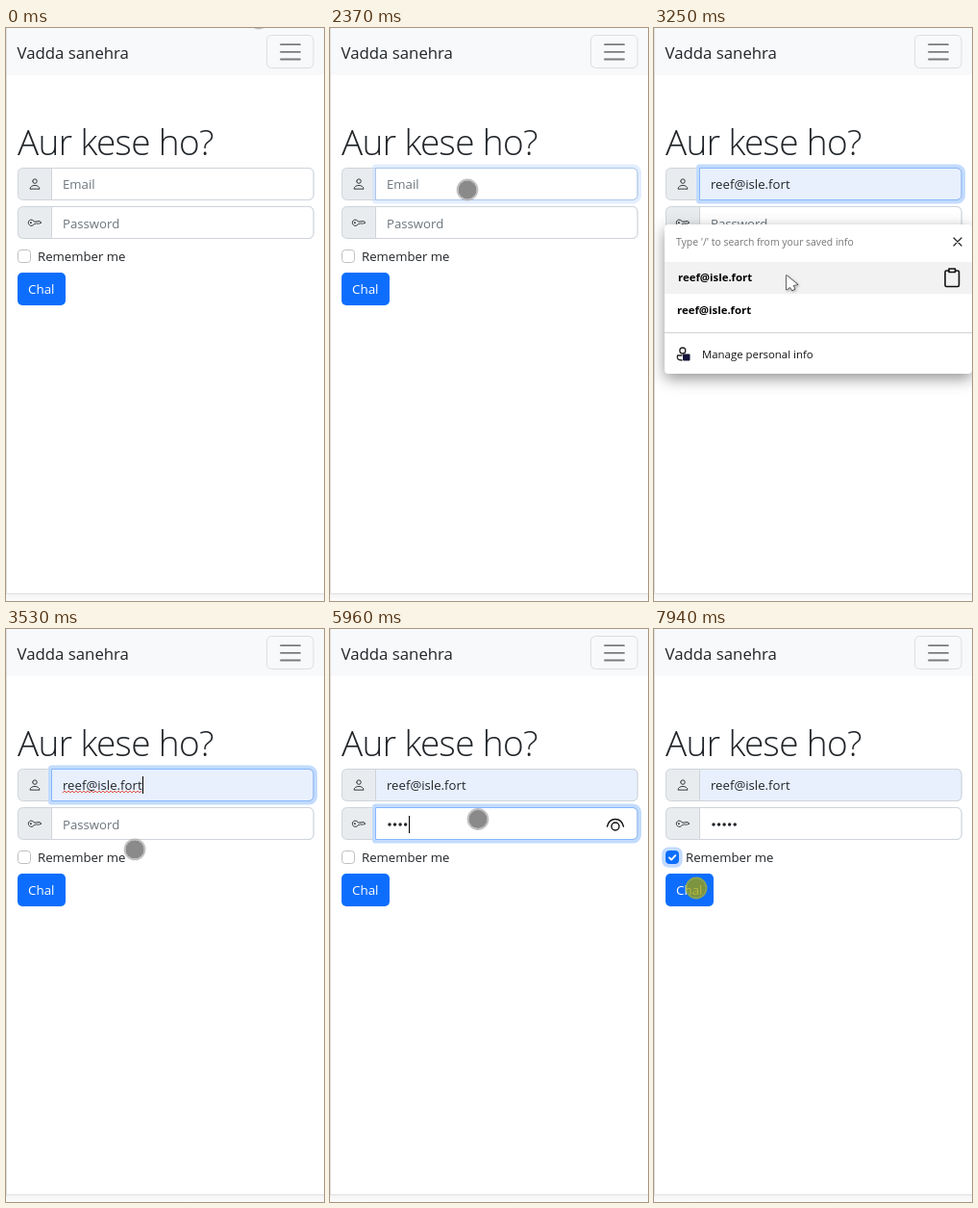
Write an HTML page with a canvas that moves like this. It is 331 px wide and 595 px high and loops after 8 s.

```html
<!DOCTYPE html>
<html lang="en">
<head>
<meta charset="utf-8">
<title>Sign in</title>
<style>
  html, body { margin: 0; width: 100%; height: 100%; overflow: hidden; background: #fff; }
  canvas { display: block; width: 100vw; height: 100vh; }
</style>
</head>
<body>
<canvas id="stage" width="331" height="595"></canvas>
<script>
const ctx = document.getElementById('stage').getContext('2d');
const LOOP = 8000;
const FONT = '"Open Sans", "Noto Sans", sans-serif';
const BRAND = 'Vadda sanehra';
const EMAIL = 'reef@isle.fort';
const BODY = 13.2;
const INK = '#212529', MUTED = '#6c757d', BLUE = '#0d6efd';
const BORDER = '#ced4da', FOCUS = '#86b7fe', AUTOFILL = '#e8f0fe';

// Moments at which the page reacts
const EMAIL_FOCUS = 2300, POPUP_OPEN = 2500, POPUP_CLOSE = 3300;
const PASS_FOCUS = 3930, CARET_OFF = 4490, CHECKED = 7440;
const KEYS = [4950, 5280, 5550, 5960, 6310];

// Pointer path: start, end, target x, target y
const MOVES = [
  [370, 1090, 297, 34.5],
  [1240, 1430, 296, 16.5],
  [1770, 2230, 143, 168],
  [2600, 2910, 138, 237],
  [2910, 3120, 138, 256.5],
  [3410, 3540, 134, 228.5],
  [3540, 3860, 152, 197.5],
  [4440, 4490, 154, 197.5],
  [6530, 6930, 61, 252],
  [7140, 7380, 20.5, 238],
  [7570, 7940, 44, 269]
];

const clamp = v => Math.max(0, Math.min(1, v));
const ease = v => v * v * (3 - 2 * v);
const fade = (t, start) => ease(clamp((t - start) / 150));

function pointerAt(t) {
  let x = 263, y = -10;
  for (const [start, end, tx, ty] of MOVES) {
    const k = ease(clamp((t - start) / (end - start)));
    x += (tx - x) * k;
    y += (ty - y) * k;
  }
  return { x, y };
}

function text(str, x, y, size, color = INK, weight = 400, spacing = 0) {
  ctx.font = `${weight} ${size}px ${FONT}`;
  ctx.letterSpacing = spacing + 'px';
  ctx.fillStyle = color;
  ctx.fillText(str, x, y);
  return ctx.measureText(str).width;
}

function box(x, y, w, h, r, fill, stroke) {
  ctx.beginPath();
  ctx.roundRect(x, y, w, h, r);
  if (fill) { ctx.fillStyle = fill; ctx.fill(); }
  if (stroke) { ctx.strokeStyle = stroke; ctx.lineWidth = 1; ctx.stroke(); }
}

function disc(x, y, r, fill) {
  ctx.beginPath();
  ctx.arc(x, y, r, 0, Math.PI * 2);
  ctx.fillStyle = fill;
  ctx.fill();
}

function line(d, x, y, scale, color, width) {
  ctx.save();
  ctx.translate(x, y);
  ctx.scale(scale, scale);
  ctx.strokeStyle = color;
  ctx.lineWidth = width;
  ctx.lineCap = ctx.lineJoin = 'round';
  ctx.stroke(new Path2D(d));
  ctx.restore();
}

function caret(x, y) {
  ctx.fillStyle = '#000';
  ctx.fillRect(Math.round(x), y, 1, 18);
}

function page() {
  ctx.fillStyle = '#fff';
  ctx.fillRect(0, 0, 331, 595);
  const shade = ctx.createLinearGradient(0, 588, 0, 595);
  shade.addColorStop(0, '#f4f4f4');
  shade.addColorStop(1, '#fcfcfc');
  ctx.fillStyle = shade;
  ctx.fillRect(0, 588, 331, 7);
  ctx.fillStyle = '#f8f9fa';
  ctx.fillRect(0, 0, 331, 49);
  ctx.fillStyle = '#dfe1e3';
  ctx.fillRect(0, 0, 1, 588);
  ctx.fillRect(0, 587, 331, 1);

  text(BRAND, 11.5, 32, 16.8);
  box(271.5, 7.5, 48.5, 34, 5, null, '#dcdee0');
  line('M286 17.2h20M286 24.9h20M286 32.5h20', 0, 0, 1, '#797c7e', 1.8);
  text('Aur kese ho?', 12, 131.5, 37, INK, 300, -0.65);
}

function field(y, fill, focus) {
  box(12.5, y, 307.5, 33, 5, '#e9ecef', BORDER);
  if (focus) {
    ctx.globalAlpha = focus;
    box(44, y - 4, 280, 41, [3.6, 8.6, 8.6, 3.6], '#c2dbfe');
    ctx.globalAlpha = 1;
  }
  const corners = [0, 5, 5, 0];
  box(47.5, y, 272.5, 33, corners, fill, BORDER);
  if (focus) {
    ctx.globalAlpha = focus;
    box(47.5, y, 272.5, 33, corners, null, FOCUS);
    ctx.globalAlpha = 1;
  }
}

function personIcon(x, y, scale) {
  line('M5.5 5a2.5 2.5 0 1 0 5 0a2.5 2.5 0 1 0-5 0M2.5 13.5c0-5 11-5 11 0z',
    x, y, scale, INK, 1);
}

function emailField(t, hovering) {
  const focus = fade(t, EMAIL_FOCUS) * (1 - fade(t, PASS_FOCUS));
  const filled = t >= POPUP_CLOSE;
  const shown = filled || hovering;
  field(145.5, shown ? AUTOFILL : '#fff', focus);
  personIcon(22.8, 154.6, 0.9);
  if (!shown) {
    text('Email', 59, 167, BODY, MUTED);
    return;
  }
  const end = 59 + text(EMAIL, 59, 167, BODY);
  if (filled && t < PASS_FOCUS) {
    let wave = 'M59 170';
    for (let x = 59, up = true; x < end - 2; x += 2, up = !up) wave += up ? 'l2-2' : 'l2 2';
    line(wave, 0, 0, 1, '#e0483e', 0.9);
    caret(end, 153);
  }
}

function passwordField(t) {
  const focus = fade(t, PASS_FOCUS) * (1 - fade(t, CHECKED));
  field(185.5, '#fff', focus);
  line('M7.2 6.5a3.5 3.5 0 1 0 0 3H8.5l1-1 1 1 1-1 1 1 1-1h1.2l.9-.6L14 6.5z',
    22.8, 195, 0.9, INK, 1);
  disc(25.9, 202.2, 0.9, INK);

  const count = KEYS.filter(k => t >= k).length;
  if (!count) text('Password', 59, 208, BODY, MUTED);
  for (let i = 0; i < count; i++) disc(62 + i * 5.55, 203, 1.75, INK);

  const active = t >= PASS_FOCUS && t < CHECKED;
  if (active && (t < CARET_OFF || count)) caret(59 + count * 5.75, 194);
  if (active && count) {
    line('M-8.5 3C-6-7 6-7 8.5 3M-4 3a4 4 0 1 0 8 0a4 4 0 1 0-8 0', 297, 202, 1, '#111', 1.4);
  }
}

function checkbox(t) {
  const on = t >= CHECKED;
  if (on) {
    ctx.globalAlpha = fade(t, CHECKED);
    box(8.2, 226.4, 21.4, 21.4, 7, '#c2dbfe');
    ctx.globalAlpha = 1;
  }
  box(12.5, 230.5, 13, 13, 3.2, on ? BLUE : '#fff', on ? BLUE : '#bfbfbf');
  if (on) line('M15.9 237.4l2.2 2.2 4.2-4.4', 0, 0, 1, '#fff', 1.9);
  text('Remember me', 33, 242, BODY);
}

function buttonPath() {
  ctx.beginPath();
  ctx.roundRect(12, 254, 50, 34, 5);
}

function button() {
  buttonPath();
  ctx.fillStyle = BLUE;
  ctx.fill();
  text('Chal', 23, 276, 13.4, '#fff', 500);
}

function popup(hovering) {
  ctx.save();
  ctx.shadowColor = 'rgba(0,0,0,.42)';
  ctx.shadowBlur = 15;
  ctx.shadowOffsetY = 5;
  box(11, 204, 320, 155, 4, '#fff');
  ctx.restore();
  if (hovering) box(11, 243, 320, 33, 0, '#f2f2f2');
  text("Type '/' to search from your saved info", 23, 226, 10.4, '#767676');
  line('M312 218l8 8M320 218l-8 8', 0, 0, 1, '#222', 1.2);
  text(EMAIL, 25, 263, 11.4, '#000', 700);
  text(EMAIL, 24, 297, 11.4, '#000', 700);
  line('M306 252h-1.5q-1.5 0-1.5 1.5v13.5q0 1.5 1.5 1.5h11.5q1.5 0 1.5-1.5v-13.5q0-1.5-1.5-1.5h-1.5M307 250h6.5v3.5h-6.5z',
    0, 0, 1, '#111', 1.6);
  ctx.fillStyle = '#d2d2d2';
  ctx.fillRect(11, 316, 320, 1);
  line('M26.8 335a3 3 0 1 0 6 0a3 3 0 1 0-6 0M29 340h-4.5q-1.5 5 4.5 5', 0, 0, 1, '#222', 1.3);
  box(30, 338.5, 7.5, 7, 1, '#15153a');
  text('Manage personal info', 50, 343, 11.4, '#111');
}

function arrow({ x, y }) {
  ctx.save();
  ctx.translate(x, y);
  ctx.shadowColor = 'rgba(0,0,0,.35)';
  ctx.shadowBlur = 3;
  ctx.shadowOffsetX = ctx.shadowOffsetY = 1;
  const shape = new Path2D('M0 .5V15l3.6-2.6 2.4 3.4 2.4-1.5-1.8-3.5 4.6-1z');
  ctx.lineJoin = 'round';
  ctx.lineWidth = 1.6;
  ctx.strokeStyle = '#4a4a4a';
  ctx.stroke(shape);
  ctx.shadowColor = 'transparent';
  ctx.fillStyle = '#fff';
  ctx.fill(shape);
  ctx.restore();
}

// Translucent, so lines and text show through
function spot({ x, y }, core, rim) {
  disc(x, y, 9.7, core);
  ctx.beginPath();
  ctx.arc(x, y, 10.5, 0, Math.PI * 2);
  ctx.strokeStyle = rim;
  ctx.lineWidth = 1.8;
  ctx.stroke();
}

function pointer(p, open) {
  if (open && p.y > 204) return arrow(p);
  ctx.save();
  buttonPath();
  ctx.rect(0, 0, 331, 595);
  ctx.clip('evenodd');
  spot(p, 'rgba(99,99,99,.75)', 'rgba(172,172,172,.75)');
  ctx.restore();

  // Olive on top of the blue button
  ctx.save();
  buttonPath();
  ctx.clip();
  spot(p, 'rgba(162,160,0,.75)', 'rgba(180,182,24,.75)');
  ctx.restore();
}

function draw(t) {
  const p = pointerAt(t);
  const open = t >= POPUP_OPEN && t < POPUP_CLOSE;
  const hovering = open && p.y > 243;
  page();
  emailField(t, hovering);
  passwordField(t);
  checkbox(t);
  button();
  if (open) popup(hovering);
  pointer(p, open);
}

const began = performance.now();
function tick() {
  draw((performance.now() - began) % LOOP);
  requestAnimationFrame(tick);
}
tick();
</script>
</body>
</html>
```
